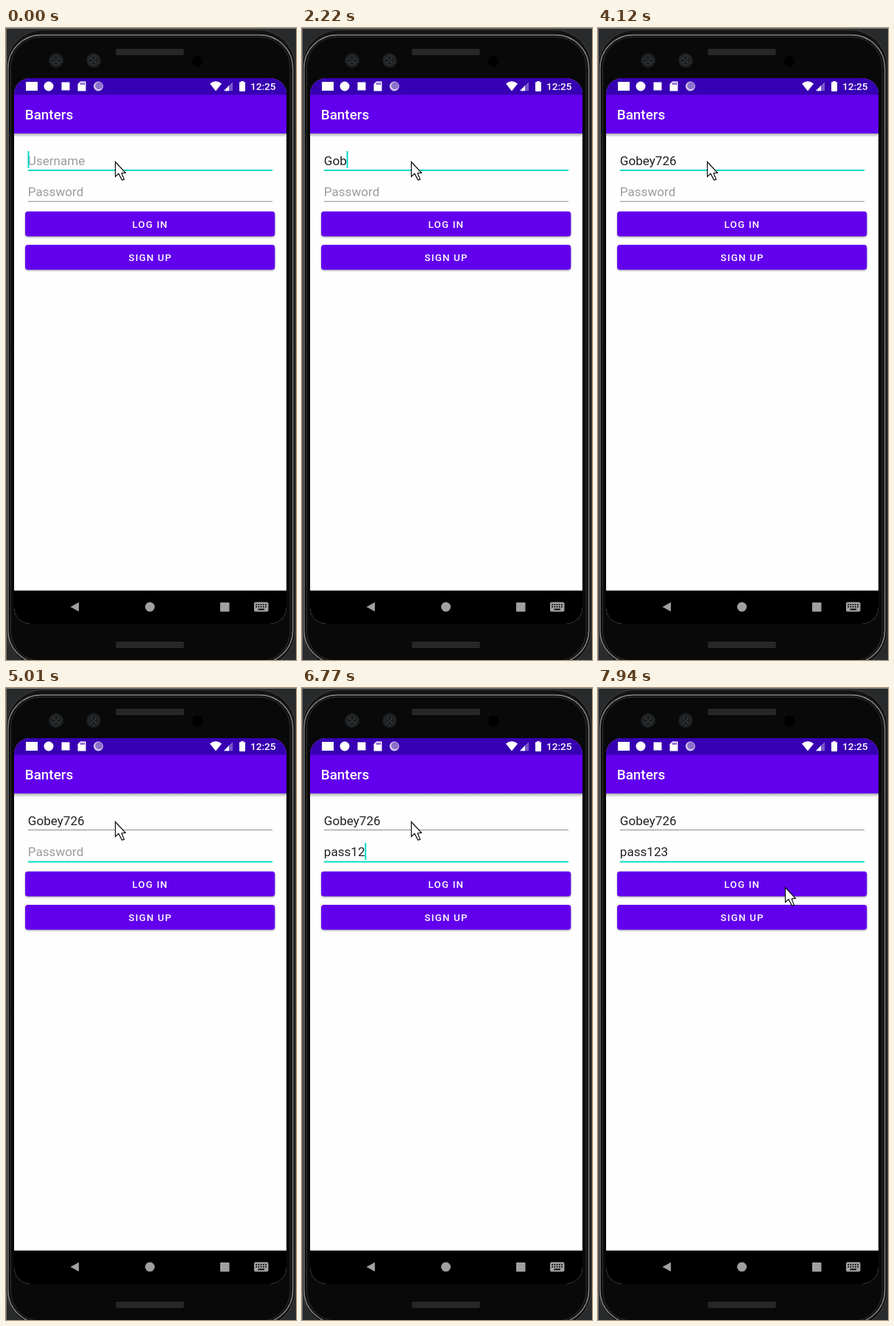
These frames come from a looping animation (394 px wide and 857 px high, 8 s). An HTML page with a canvas:

```html
<!DOCTYPE html>
<html lang="en">
<head>
<meta charset="utf-8">
<title>Login screen</title>
<style>
  html, body { margin: 0; width: 100%; height: 100%; overflow: hidden; background: #252627; }
  canvas { display: block; width: 394px; height: 857px; }
</style>
</head>
<body>
<canvas id="stage"></canvas>
<script>
const W = 394, H = 857, LOOP = 8000;
const canvas = document.getElementById('stage');
const ratio = window.devicePixelRatio || 1;
canvas.width = W * ratio;
canvas.height = H * ratio;
const ctx = canvas.getContext('2d');

const PURPLE = '#6200ee', DARK_PURPLE = '#3700b3', TEAL = '#03dac5', ICON = '#a0a0a0';
const FONT = 'Roboto, "Noto Sans", sans-serif';

// Key times in ms: caret toggles, keystrokes and pointer jumps.
const FOCUS_PASSWORD = 4420;
const userField = {
  text: 'Gobey726', hint: 'Username', baseline: 186, line: 192, caretY: 167,
  keys: [1180, 1770, 2220, 2520, 2800, 3250, 3530, 3680],
  caretOff: [[160, 620], [1030, 1180], [4120, FOCUS_PASSWORD]]
};
const passField = {
  text: 'pass123', hint: 'Password', baseline: 228, line: 234.7, caretY: 210,
  keys: [5300, 5600, 5880, 6030, 6470, 6770, 7210],
  caretOff: [[5010, 5300], [7650, LOOP]]
};
const pointerPath = [[0, 148, 181], [7650, 163, 196], [7790, 233, 248], [7940, 254, 270]];

function rect(x, y, w, h, color) {
  ctx.fillStyle = color;
  ctx.fillRect(x, y, w, h);
}

function rounded(x, y, w, h, r, fill, stroke, lineWidth = 1) {
  ctx.beginPath();
  ctx.roundRect(x, y, w, h, r);
  if (fill) { ctx.fillStyle = fill; ctx.fill(); }
  if (stroke) { ctx.strokeStyle = stroke; ctx.lineWidth = lineWidth; ctx.stroke(); }
}

function disc(x, y, r, color) {
  ctx.beginPath();
  ctx.arc(x, y, r, 0, Math.PI * 2);
  ctx.fillStyle = color;
  ctx.fill();
}

function polygon(points, fill, stroke) {
  ctx.beginPath();
  points.forEach(([x, y]) => ctx.lineTo(x, y));
  ctx.closePath();
  ctx.fillStyle = fill;
  ctx.fill();
  if (stroke) { ctx.strokeStyle = stroke; ctx.lineWidth = 1.1; ctx.stroke(); }
}

function label(text, x, y, size, color, weight = 400, spacing = 0) {
  ctx.font = `${weight} ${size}px ${FONT}`;
  ctx.letterSpacing = spacing + 'px';
  ctx.fillStyle = color;
  ctx.fillText(text, x, y);
}

function speaker(y) {
  rounded(149, y, 93, 9, 2, '#1e1e1e');
  for (let row = 0; row < 4; row++)
    for (let x = 150 + row % 2; x < 241; x += 2)
      rect(x, y + 1 + row * 2, 1, 1, '#424242');
}

function lens(x, y) {
  disc(x, y, 10, '#1c1e20');
  disc(x, y, 7.5, '#26292b');
  disc(x, y, 5, '#141617');
  for (let i = 0; i < 4; i++) {
    const a = Math.PI * (0.25 + i / 2);
    disc(x + 3.5 * Math.cos(a), y + 3.5 * Math.sin(a), 1.1, '#4a4e50');
  }
  disc(x, y, 1.5, '#34383a');
}

function phoneBody() {
  rect(0, 0, W, H, '#292a2b');
  rounded(0.5, 2.5, 392.5, 864, 50, '#131313', '#3e3e3e');
  rounded(2.7, 9.5, 387, 852, 45, '#101010', '#858585', 1.4);
  rounded(6.5, 12.5, 379.5, 846, 41, '#090909', '#2e2e2e');
  rect(0, 0, W, 1, '#858585');
  rect(0, 0, 1, H, '#707070');
  speaker(28);
  speaker(832);
  lens(68, 44);
  lens(119, 44);
  disc(260, 45, 7.5, '#000');
}

function statusIcons() {
  rounded(27, 73, 16, 12, 0, '#fff');
  disc(58, 79, 6.5, '#fff');
  rounded(75.5, 73.5, 11, 11, 0, '#fff');

  polygon([[101, 72.5], [108.5, 72.5], [108.5, 85.5], [97.5, 85.5], [97.5, 76]], '#fff');
  for (let i = 0; i < 3; i++) rect(101.3 + i * 2.2, 74, 1.1, 3, DARK_PURPLE);

  disc(125.5, 79, 6.5, '#d5c8ed');
  disc(126.3, 78.2, 5, '#8d72ca');

  ctx.beginPath();
  ctx.moveTo(285, 85.5);
  ctx.lineTo(277, 75.4);
  ctx.quadraticCurveTo(285, 69, 293, 75.4);
  ctx.closePath();
  ctx.fillStyle = '#fff';
  ctx.fill();

  polygon([[308, 73], [308, 85.3], [296, 85.3]], '#7957c9');
  polygon([[303, 78.1], [303, 85.3], [296, 85.3]], '#fff');

  rounded(317, 73.3, 8, 12.7, 1, '#fff');
  rect(319.3, 72, 3.4, 2, '#fff');
  label('12:25', 331.9, 84, 13.7, '#fff', 500);
}

function navBar() {
  rect(11, 762.8, 370, 46, '#000');
  polygon([[87.5, 785], [99, 778.7], [99, 791.3]], ICON);
  disc(195.5, 785, 6.5, ICON);
  rounded(291, 779, 12.5, 12.5, 1, ICON);
  rounded(337, 778.5, 19.5, 13, 2, ICON);
  for (let row = 0; row < 2; row++)
    for (let col = 0; col < 5; col++)
      rect(339.3 + col * 3.2, 781 + row * 3, 1.7, 1.7, '#000');
  rect(342.5, 787.5, 8.5, 1.8, '#000');
}

function button(text, y, textX) {
  ctx.save();
  ctx.shadowColor = 'rgba(0,0,0,.34)';
  ctx.shadowBlur = 2.5 * ratio;
  ctx.shadowOffsetY = 1.2 * ratio;
  rounded(26, y, 339.3, 33.7, 3.8, PURPLE);
  ctx.restore();
  label(text, textX, y + 22.1, 13.3, '#fff', 500, 1.18);
}

function field(f, focused, t) {
  const left = 29.8;
  const typed = f.text.slice(0, f.keys.filter(k => k <= t).length);
  rect(left, f.line, 332.2, focused ? 1.9 : 1, focused ? TEAL : '#8c8c8c');
  label(typed || f.hint, left, f.baseline, 17.1, typed ? '#212121' : '#9c9c9c');
  const hidden = f.caretOff.some(([from, to]) => t >= from && t < to);
  if (focused && !hidden)
    rect(left - 0.3 + ctx.measureText(typed).width, f.caretY, 2, 23, TEAL);
}

function pointer(t) {
  const [, x, y] = pointerPath.filter(p => p[0] <= t).pop();
  const arrow = [[0, 0], [0, 20], [4.5, 16], [9, 24.6], [12, 24], [8.6, 15.4], [13.9, 14.8]];
  polygon(arrow.map(([dx, dy]) => [x + 0.5 + dx, y + 0.5 + dy]), '#fff', '#000');
}

function appScreen(t) {
  ctx.save();
  ctx.beginPath();
  ctx.roundRect(11, 68, 370, 740, 22);
  ctx.clip();
  rect(11, 68, 370, 740, '#fefefe');
  const shade = ctx.createLinearGradient(0, 143, 0, 148);
  shade.addColorStop(0, 'rgba(0,0,0,.32)');
  shade.addColorStop(1, 'rgba(0,0,0,0)');
  rect(11, 143, 370, 5, shade);
  rect(11, 68, 370, 75, PURPLE);
  rect(11, 68, 370, 22.6, DARK_PURPLE);
  statusIcons();
  label('Banters', 25.7, 124.2, 18.9, '#fff', 500);
  const onPassword = t >= FOCUS_PASSWORD;
  field(userField, !onPassword, t);
  field(passField, onPassword, t);
  button('LOG IN', 248.8, 171.6);
  button('SIGN UP', 294, 166.6);
  navBar();
  ctx.restore();
}

function draw(now) {
  const t = now % LOOP;
  ctx.setTransform(ratio, 0, 0, ratio, 0, 0);
  phoneBody();
  appScreen(t);
  pointer(t);
}

let start;
function tick(now) {
  start ??= now;
  draw(Math.max(0, now - start));
  requestAnimationFrame(tick);
}
draw(0);
requestAnimationFrame(tick);
</script>
</body>
</html>
```
